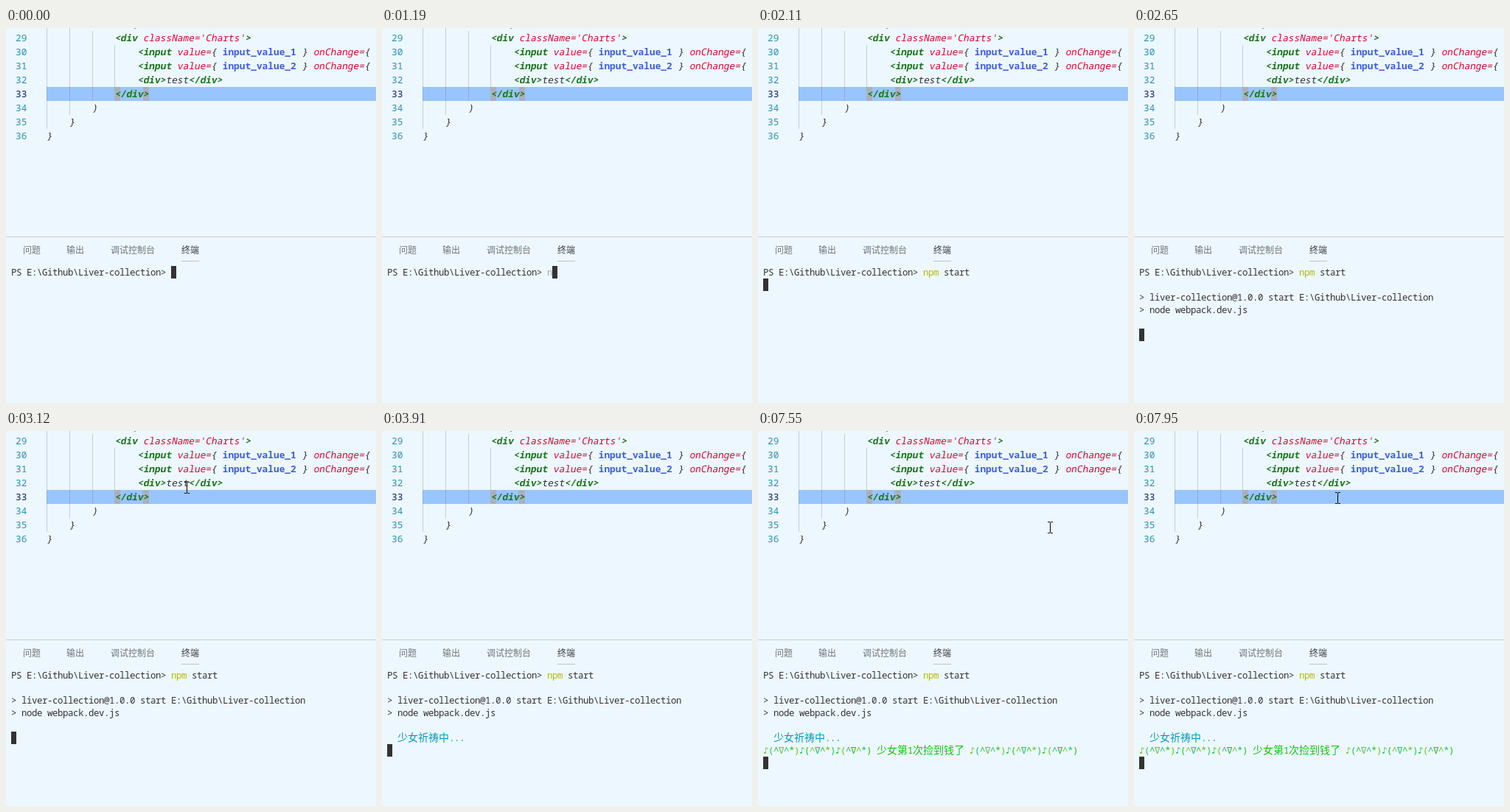
Write an HTML page with a canvas that moves like this. It is 502x509 px and loops after 8 s.

```html
<!DOCTYPE html>
<html lang="zh-CN">
<head>
<meta charset="utf-8">
<title>Terminal</title>
<style>
  html, body { margin: 0; width: 100%; height: 100%; overflow: hidden; background: #edf7ff; }
  canvas { display: block; }
</style>
</head>
<body>
<canvas id="stage" width="502" height="509"></canvas>
<script>
const ctx = document.getElementById('stage').getContext('2d', { alpha: false });
const LOOP = 8000;
const MONO = '"Noto Sans Mono", "DejaVu Sans Mono", monospace';
const CJK = '"Noto Sans CJK SC", "Noto Sans CJK", sans-serif';
const INK = '#333333', YELLOW = '#b5ba00', GREEN = '#14c414', CYAN = '#0598bc';

function rect(x, y, w, h, color) {
  ctx.fillStyle = color;
  ctx.fillRect(x, y, w, h);
}

function text(str, x, y, font, color, slant = 0) {
  ctx.font = font;
  ctx.fillStyle = color;
  ctx.setTransform(1, 0, -slant, 1, x, y);
  ctx.fillText(str, 0, 0);
  ctx.resetTransform();
}

// Editor: 7.7px columns, 19px lines
const COL = 7.7, LINE = 19, SLANT = 0.18;
const CODE_FONT = '12.833px ' + MONO;
const STYLES = {
  tag: ['bold ', '#1b751b', SLANT],
  attr: ['500 ', '#d2052f', SLANT],
  name: ['600 ', '#3c5fd6', 0],
  ink: ['500 ', INK, SLANT]
};

const inputLine = n => [16, 'tag', '<input', 'attr', ' value=', 'ink', '{ ',
  'name', 'input_value_' + n, 'ink', ' } ', 'attr', 'onChange=', 'ink', '{'];

// Each line: indent, then style / text pairs
const code = [
  [8, 'ink', 'return ('],
  [12, 'tag', '<div', 'attr', " className='Charts'", 'tag', '>'],
  inputLine(1),
  inputLine(2),
  [16, 'tag', '<div>', 'ink', 'test', 'tag', '</div>'],
  [12, 'tag', '</div>'],
  [8, 'ink', ')'],
  [4, 'ink', '}'],
  [0, 'ink', '}']
];

function drawEditor() {
  rect(55, 80, 447, LINE, '#99c5ff');
  rect(147, 80, 8, LINE, '#a9b0bc');
  rect(186, 80, 8, LINE, '#a9b0bc');

  const guide = 'rgba(120,130,140,.35)';
  rect(55, 0, 1, 137, guide);
  rect(86, 0, 1, 118, guide);
  rect(117, 4, 1, 95, guide);
  rect(147, 23, 1, 57, guide);

  code.forEach(([indent, ...parts], i) => {
    const y = i * LINE - 1;
    text(28 + i, 13, y, CODE_FONT, i === 5 ? '#0b216f' : '#2b91af');
    let col = indent;
    for (let k = 0; k < parts.length; k += 2) {
      const [weight, color, slant] = STYLES[parts[k]];
      text(parts[k + 1], 55 + col * COL, y, weight + CODE_FONT, color, slant);
      col += parts[k + 1].length;
    }
  });
}

function drawTabs() {
  rect(0, 283, 502, 1, '#c8ced2');
  [['问题', 23], ['输出', 82], ['调试控制台', 142], ['终端', 238]].forEach(([label, x], i) =>
    text(label, x, 306, '12px ' + CJK, i === 3 ? '#3a3f43' : '#71767a'));
  rect(238, 316, 24, 1, '#bfc4c8');
}

// Terminal: 7 x 17 px cells; CJK characters take two
const CELL = 7, ROW = 17;

function print(str, col, row, color) {
  [...str].forEach((ch, i) => {
    const wide = ch > '\u2e80';
    const c = typeof color === 'function' ? color(i) : color;
    text(ch, 7 + col * CELL, 336 + row * ROW, wide ? '14px ' + CJK : '12.4px ' + MONO, c);
    col += wide ? 2 : 1;
  });
  return col;
}

const COMMAND = 'npm start';
const typed = [[1190, 1], [1270, 2], [1420, 3], [1500, 5], [1580, 6], [1650, 7], [1730, 8], [1960, 9]];
const song = '♪(^∇^*)'.repeat(3);
const tints = i => ['#6cc010', '#12c070', GREEN][i % 3];

function drawTerminal(t) {
  let n = 0;
  for (const [at, count] of typed) if (t >= at) n = count;

  print('PS E:\\Github\\Liver-collection>', 0, 0, INK);
  print(COMMAND.slice(0, n), 31, 0, i => n === 1 ? '#a5a5a5' : i < 3 ? YELLOW : INK);

  let col = 31 + n, row = 0;
  if (t >= 2110) { col = 0; row = 1; }
  if (t >= 2650) {
    print('> liver-collection@1.0.0 start E:\\Github\\Liver-collection', 0, 2, INK);
    print('> node webpack.dev.js', 0, 3, INK);
    row = 5;
  }
  if (t >= 3910) {
    print('少女祈祷中...', 2, 5, CYAN);
    row = 6;
  }
  if (t >= 6940) {
    let c = print(song, 0, 6, tints);
    c = print(' 少女第1次捡到钱了 ', c, 6, GREEN);
    print(song, c, 6, tints);
    row = 7;
  }
  rect(7 + col * CELL, 323 + row * ROW, CELL, ROW, INK);
}

// Pointer moves: start, end, step count, gap, from, to, easing power
const moves = [
  [2880, 3440, 4, 80, [331, 198], [245, 77], 1.8],
  [3440, 3590, 2, 75, [305, 90], [393, 118], 1],
  [7320, 8000, 9, 78.75, [489, 162], [276, 91], 2]
];

function drawPointer(t) {
  for (const [start, end, steps, gap, a, b, pow] of moves) {
    if (t < start || t >= end) continue;
    const p = Math.min(1, Math.floor((t - start) / gap + 1e-6) / (steps - 1));
    const e = 1 - (1 - p) ** pow;
    const x = Math.round(a[0] + (b[0] - a[0]) * e);
    const y = Math.round(a[1] + (b[1] - a[1]) * e);
    rect(x, y - 7, 1, 14, '#000');
    for (const cy of [y - 8, y + 7]) {
      rect(x - 3, cy, 3, 1, '#000');
      rect(x + 1, cy, 3, 1, '#000');
    }
  }
}

function frame() {
  const t = performance.now() % LOOP;
  rect(0, 0, 502, 509, '#edf7ff');
  drawEditor();
  drawTabs();
  drawTerminal(t);
  drawPointer(t);
  requestAnimationFrame(frame);
}
frame();
</script>
</body>
</html>
```
